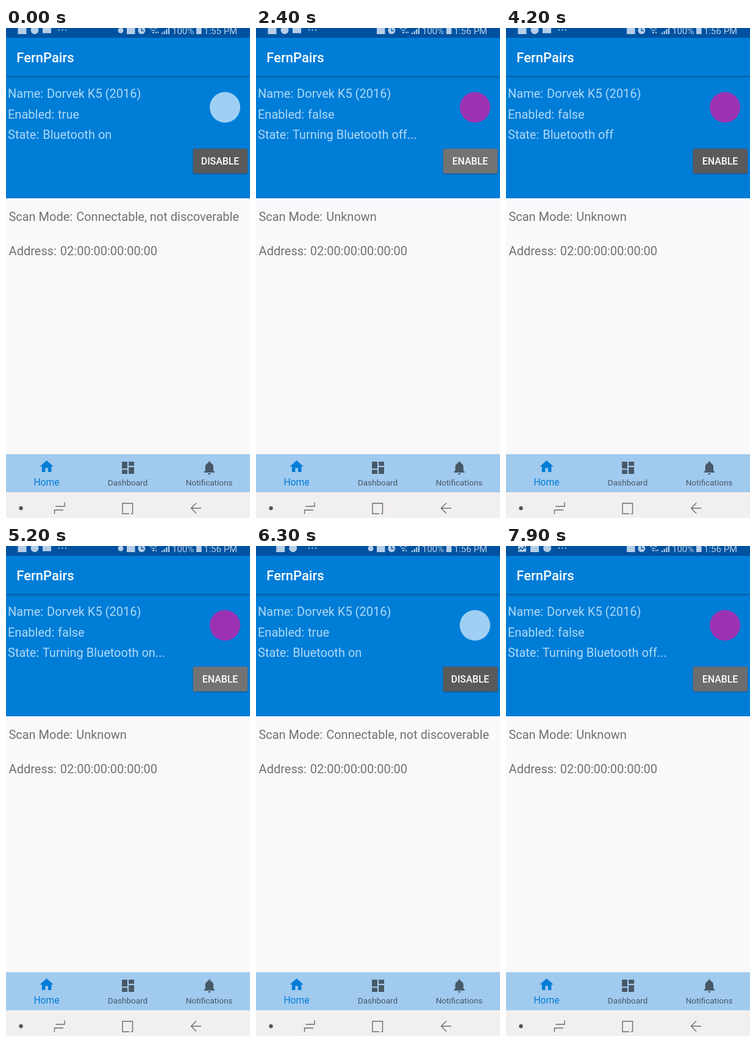
Recreate the animation shown at these times as an HTML page. Size 400x800 px, loop 8 s.

```html
<!DOCTYPE html>
<html lang="en">
<head>
<meta charset="utf-8">
<title>Bluetooth switch</title>
<style>
html, body { margin: 0; width: 100%; height: 100%; overflow: hidden; }
svg { display: block; width: 100%; height: 100%; }
text { font-family: Roboto, "Noto Sans", sans-serif; white-space: pre; }
.bold { font-weight: 500; fill: #fff; }
.mid { text-anchor: middle; }
.info { font-size: 20px; fill: #addaf7; }
.detail { font-size: 20px; fill: #727171; }
.tab { font-size: 13.5px; fill: #475967; }
.line { fill: none; stroke: #6c6c6c; stroke-width: 1.4; }
#button { filter: drop-shadow(0 1px 1px rgba(0, 0, 0, .3)); }
</style>
</head>
<body>
<svg viewBox="0 0 400 800">
  <defs>
    <linearGradient id="shade" x2="0" y2="1">
      <stop stop-color="#000" stop-opacity=".24"/>
      <stop offset="1" stop-color="#000" stop-opacity="0"/>
    </linearGradient>
  </defs>
  <rect id="page" width="400" height="800"/>

  <!-- status bar -->
  <rect width="400" height="16" fill="#0052a1"/>
  <g fill="#b5cee8">
    <g id="notices">
      <rect x="19.5" width="14" height="10"/>
      <circle cx="47" cy="3.5" r="6.5"/>
      <rect id="last" x="60" y="-1" width="14" height="9.5"/>
    </g>
    <g id="picture">
      <rect x="20" y="-2" width="13" height="11.5"/>
      <path d="M21 7l3-4 3 3 3-5 2 3" fill="none" stroke="#0052a1" stroke-width="1.4"/>
    </g>
    <path d="M86 2.5h2v2h-2zm5.5 0h2v2h-2zm5.5 0h2v2h-2z"/>
    <circle id="radio" cx="188" cy="4" r="4.5"/>
    <rect x="198" y="-2" width="13.5" height="12"/>
    <circle cx="222.3" cy="4" r="6"/>
    <path d="M222.3 0v4.5h3.5" fill="none" stroke="#0052a1" stroke-width="1.3"/>
    <path d="M236 1.5q5.5-4 11 0M238.3 4.5q3.2-2.3 6.4 0" fill="none" stroke="#b5cee8" stroke-width="1.4"/>
    <circle cx="241.5" cy="7.3" r="1.5"/>
    <path d="M244.5 6.5h3l-1.5 3z"/>
    <path id="up" d="M247.5 8h3l-1.5-3z"/>
    <path d="M255 7.5h2.2V10H255zm3.6-2.5h2.2v5h-2.2zm3.6-3h2.2v8h-2.2zm3.6-3h2.2v11h-2.2z"/>
    <rect x="312" y="-2" width="8.5" height="12"/>
    <text x="272" y="9.5" font-size="15">100%</text>
    <text id="clock" x="324" y="9.5" font-size="15"></text>
  </g>

  <!-- header -->
  <rect y="16" width="400" height="262" fill="#007dd7"/>
  <rect y="78" width="400" height="5" fill="url(#shade)"/>
  <text class="bold" x="17.3" y="55.5" font-size="22">FernPairs</text>
  <text class="info" x="3" y="114">Name: <tspan dx="1">Dorvek K5 (2016)</tspan></text>
  <text class="info" x="3" y="147.7">Enabled: <tspan dx="1" id="enabled"></tspan></text>
  <text class="info" x="3" y="181.3">State: <tspan dx="1" id="state"></tspan></text>
  <circle id="badge" cx="359" cy="129.5" r="25"/>
  <rect id="button" x="306.700" y="197" width="89.300" height="40.500" rx="2"/>
  <text class="bold mid" id="action" x="351" y="223" font-size="15.8"></text>

  <!-- details -->
  <text class="detail" x="4.4" y="314.8">Scan Mode: <tspan dx="1" id="scan"></tspan></text>
  <text class="detail" x="4.6" y="370.8">Address: <tspan dx="1">02:00:00:00:00:00</tspan></text>

  <!-- tabs -->
  <rect y="695" width="400" height="1" opacity=".04"/>
  <rect y="696" width="400" height="62" fill="#a1caef"/>
  <path transform="translate(53.3 702.7) scale(1.111)" fill="#007dd7" d="M10 20v-6h4v6h5v-8h3L12 3 2 12h3v8z"/>
  <g fill="#475967">
    <path transform="translate(186.7 704.7) scale(1.111)" d="M3 13h8V3H3v10zm0 8h8v-6H3v6zm10 0h8V11h-8v10zm0-18v6h8V3h-8z"/>
    <path transform="translate(320 704.7) scale(1.111)" d="M12 22c1.1 0 2-.9 2-2h-4c0 1.1.9 2 2 2zm6-6v-5c0-3.07-1.64-5.64-4.5-6.32V4c0-.83-.67-1.5-1.5-1.5s-1.5.67-1.5 1.5v.68C7.63 5.36 6 7.92 6 11v5l-2 2v1h16v-1l-2-2z"/>
  </g>
  <text class="mid" x="66.5" y="746.6" font-size="15.7" fill="#007dd7">Home</text>
  <text class="tab mid" x="199.5" y="746.6">Dashboard</text>
  <text class="tab mid" x="333" y="746.6">Notifications</text>

  <!-- system keys -->
  <rect y="758" width="400" height="42" fill="#f2f0ef"/>
  <circle cx="24.5" cy="784" r="3.2" fill="#555"/>
  <path class="line" d="M81.500 781H96V774.500M94 787H79.500V793.500"/>
  <path class="line" d="M202 793H191V776H207.500V793H205"/>
  <path class="line" d="M320 784H303.500M312 775.500L303.500 784L312 792.500"/>
</svg>
<script>
const $ = id => document.getElementById(id);
const clamp = x => Math.max(0, Math.min(1, x));
const show = (id, visible) => $(id).setAttribute("opacity", +visible);
const paint = (id, color) => $(id).setAttribute("fill", color);
const write = (id, text) => { if ($(id).textContent !== text) $(id).textContent = text; };

// Start of each adapter state, in ms
const states = [
  [0, "Bluetooth on"], [2400, "Turning Bluetooth off..."], [2700, "Bluetooth off"],
  [5100, "Turning Bluetooth on..."], [5400, "Bluetooth on"], [7800, "Turning Bluetooth off..."]
];
// Button presses: start, peak, start of fade, end
const presses = [[2100, 2300, 2500, 2900], [4900, 5100, 5200, 5600], [7500, 7700, 7800, 8200]];

function draw(now) {
  const t = Math.floor(now % 8000 / 100) * 100;
  const state = states.filter(s => s[0] <= t).pop()[1];
  const on = state === "Bluetooth on";
  const glow = Math.max(...presses.map(([a, b, c, d]) =>
    Math.min(clamp((t - a) / (b - a)), clamp((d - t) / (d - c)))));
  const gray = Math.round(90 + 25 * glow);
  const slide = clamp((t - 6100) / 300);

  paint("page", t < 2400 ? "#faf9f7" : "#faf8fb");
  write("clock", t < 1200 ? "1:55 PM" : "1:56 PM");
  show("radio", !/off/.test(state));
  show("up", t < 4200 || t >= 7200);
  $("notices").setAttribute("transform", `translate(${20.5 * slide})`);
  show("last", slide === 0);
  show("picture", slide === 1);

  write("enabled", String(on));
  write("state", state);
  write("action", on ? "DISABLE" : "ENABLE");
  write("scan", on ? "Connectable, not discoverable" : "Unknown");
  paint("badge", on ? "#9fd0f3" : "#9c32b3");
  paint("button", `rgb(${gray},${gray},${gray})`);
}

let start;
function tick(now) {
  start ??= now;
  draw(now - start);
  requestAnimationFrame(tick);
}
draw(0);
requestAnimationFrame(tick);
</script>
</body>
</html>
```
